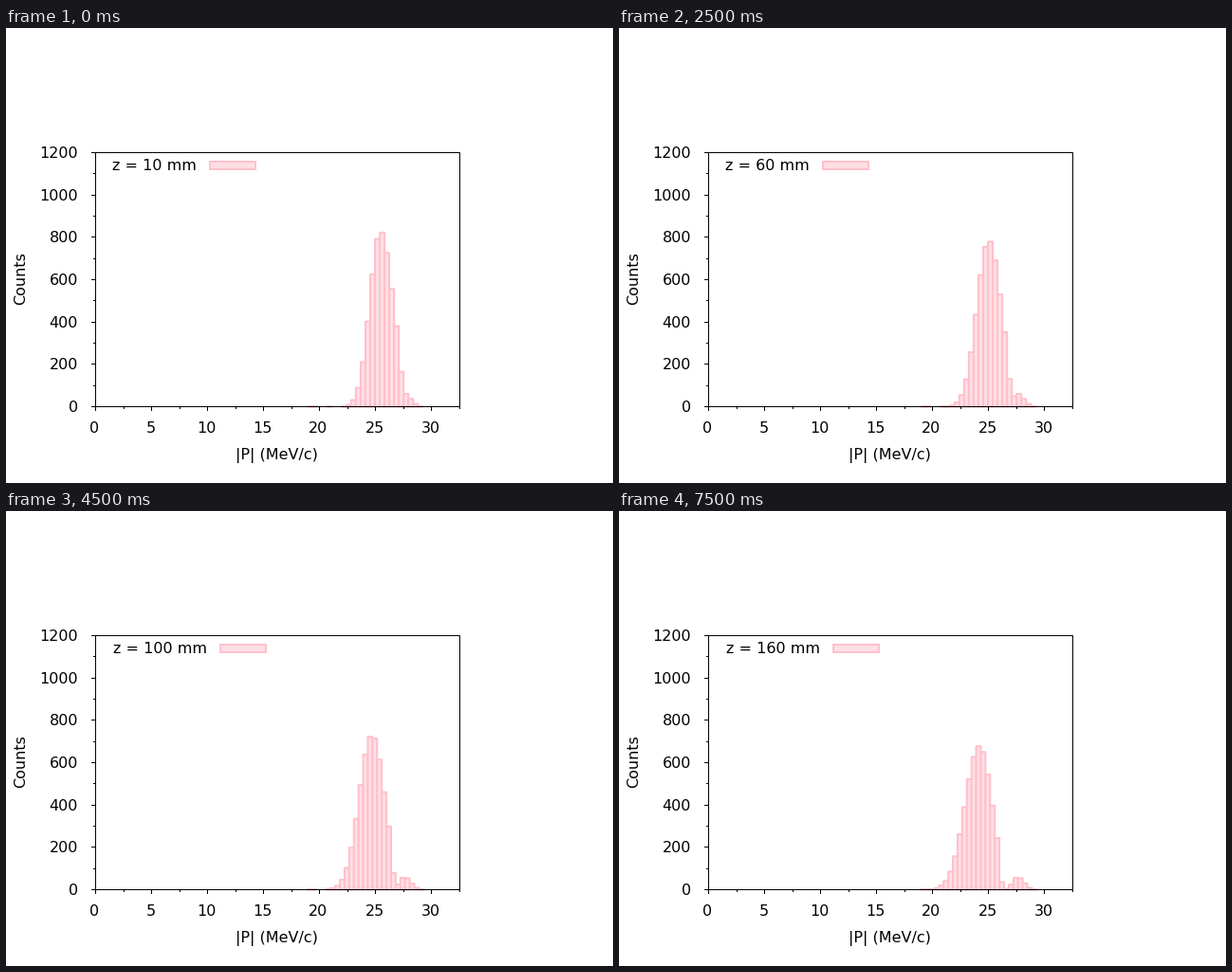
These frames come from a looping animation (640x480 px, 8 s). A matplotlib script:

```python
import numpy as np
import matplotlib.pyplot as plt
from matplotlib.animation import FuncAnimation
from matplotlib.collections import PolyCollection
from matplotlib.patches import Rectangle

plt.rcParams.update({"font.family": "DejaVu Sans", "font.size": 16,
                     "path.snap": False, "toolbar": "None"})

W, H = 640, 480
LEFT, RIGHT, TOP, BOTTOM = 94.5, 478.5, 131.5, 399.5
X_MAX, Y_MAX = 32.5, 1200
EDGE, FILL = "#ffc0cb", "#ffdfe5"

N_BINS = 74
STRAYS = [19.2, 19.6, 20.9]        # lone slow particles


def px(p):
    return LEFT + (RIGHT - LEFT) * p / X_MAX


def py(c):
    return BOTTOM - (BOTTOM - TOP) * c / Y_MAX


def bell(p, mid, left, right):
    """Gaussian with its own width on each side."""
    return np.exp(-0.5 * ((p - mid) / np.where(p < mid, left, right)) ** 2)


def density(p, z):
    """Counts per MeV/c: the beam slows and spreads, a halo stays put."""
    mid = 25.5 - 0.0083 * z
    cutoff = 1 / (1 + np.exp((p - mid - 1.85) / 0.06))
    beam = (1980 - 2.1 * z) * bell(p, mid, 0.91 + 0.0022 * z, 1.11) * cutoff
    halo = 150 * bell(p, 27.55, 0.4, 0.55)
    return beam + halo


def histogram(z):
    width = 0.4261 if z < 70 else 0.4152
    edges = (np.arange(N_BINS + 1) - 0.5) * width
    steps = (np.arange(16) + 0.5) / 16 * width
    counts = density(edges[:-1, None] + steps, z).mean(axis=1) * width
    return edges, counts + 2 * np.histogram(STRAYS, edges)[0]


def boxes(z):
    edges, counts = histogram(z)
    return [[(px(a), BOTTOM), (px(a), py(c)), (px(b), py(c)), (px(b), BOTTOM)]
            for a, b, c in zip(edges[:-1], edges[1:], counts) if c >= 1.5]


fig = plt.figure(figsize=(W / 72, H / 72), dpi=72, facecolor="white")
ax = fig.add_axes([0, 0, 1, 1])
ax.set_xlim(0, W)
ax.set_ylim(H, 0)
ax.axis("off")


def line(xs, ys):
    ax.plot(xs, ys, color="black", lw=1, solid_capstyle="butt", zorder=3)


def label(x, y, s, ha="center", **kw):
    return ax.text(x, y, s, ha=ha, va="baseline", zorder=4, **kw)


def crisp(v):
    return np.floor(v) + 0.5


ax.add_patch(Rectangle((LEFT, TOP), RIGHT - LEFT, BOTTOM - TOP,
                       fill=False, ec="black", lw=1, zorder=3))

for n in range(14):
    x = crisp(px(2.5 * n))
    line([x, x], [BOTTOM, BOTTOM + (2.5 if n % 2 else 4.5)])
    if n % 2 == 0:
        label(x - 1, 427, f"{2.5 * n:.0f}")

for n in range(13):
    y = crisp(py(100 * n))
    line([LEFT - (2.5 if n % 2 else 4.5), LEFT], [y, y])
    if n % 2 == 0:
        label(76, y + 5.5, str(100 * n), ha="right")

label(285, 455, "|P| (MeV/c)")
label(20, 264.5, "Counts", rotation=90, rotation_mode="anchor")

bars = PolyCollection([], closed=True, facecolors=FILL, edgecolors=EDGE,
                      linewidths=2, zorder=2)
ax.add_collection(bars, autolim=False)
key_text = label(201, 150, "", ha="right")
key_box = Rectangle((215, 141), 48, 8, fc=FILL, ec=EDGE, lw=2, zorder=2)
ax.add_patch(key_box)


def update(i):
    z = 10 * (i + 1)
    shift = 11 if z >= 100 else 0
    bars.set_verts(boxes(z))
    key_text.set_text(f"z = {z} mm")
    key_text.set_x(201 + shift)
    key_box.set_x(215 + shift)
    return bars, key_text, key_box


anim = FuncAnimation(fig, update, frames=16, interval=500, repeat=True,
                     repeat_delay=0, blit=False)
plt.show()
```
